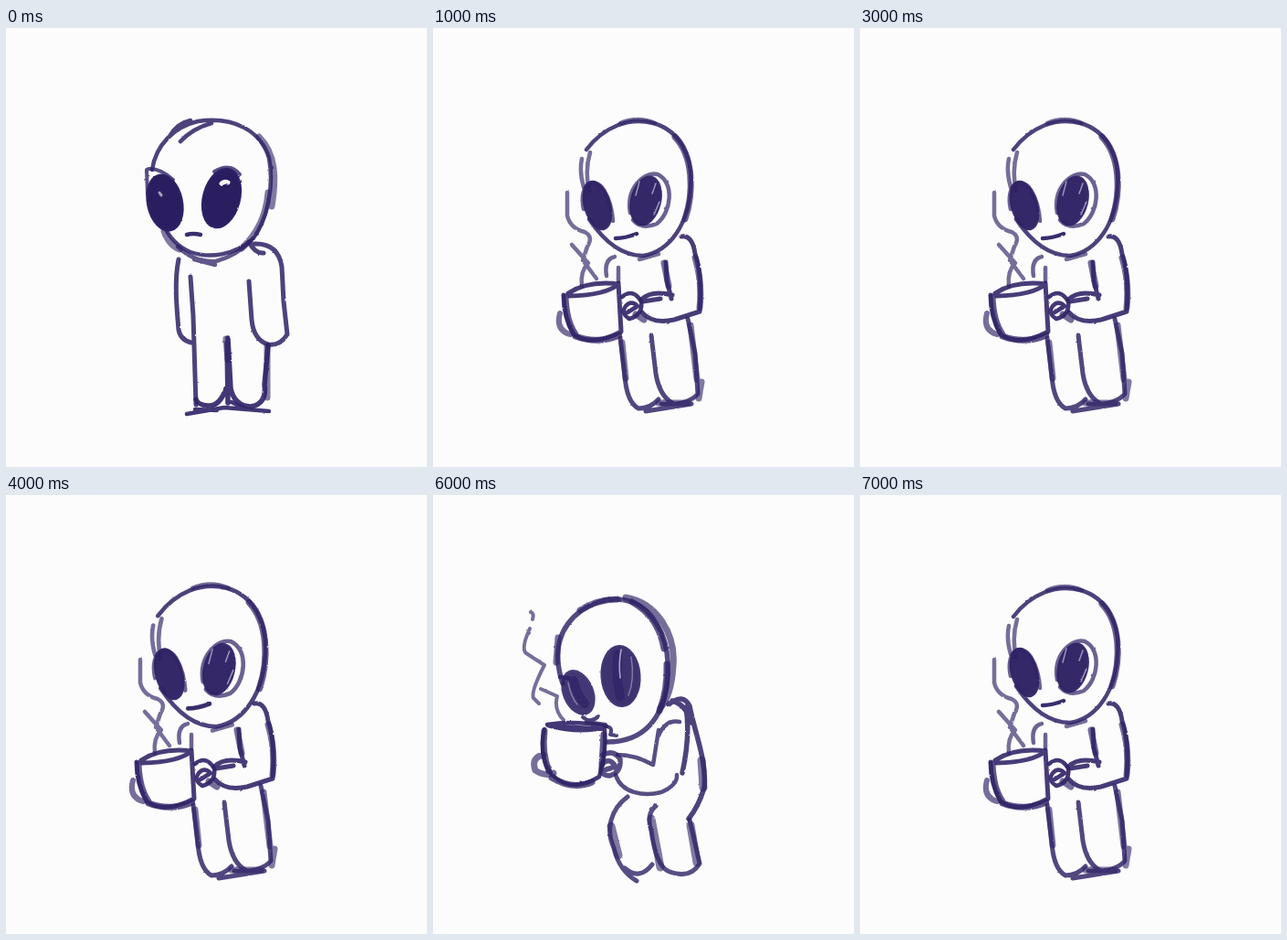
Write an HTML page that moves like this. It is 461x480 px and loops after 8 s.

```html
<!DOCTYPE html>
<html lang="en">
<head>
<meta charset="utf-8">
<title>Alien coffee break</title>
<style>
  html, body { margin: 0; width: 100%; height: 100%; overflow: hidden; background: #fcfcfc; }
  svg { display: block; width: 100%; height: 100%; }
  path { fill: none; stroke: #2f2266; stroke-linecap: round; stroke-linejoin: round; }
  ellipse { fill: #2a1d60; stroke: #2f2266; stroke-width: 2; }
</style>
</head>
<body>
<svg id="stage" viewBox="0 0 461 480">
  <filter id="pencil" filterUnits="userSpaceOnUse" x="0" y="0" width="461" height="480" color-interpolation-filters="sRGB">
    <feTurbulence type="fractalNoise" baseFrequency=".2" numOctaves="2" seed="4"/>
    <feDisplacementMap in="SourceGraphic" scale="1.8" xChannelSelector="R" yChannelSelector="G"/>
    <feGaussianBlur stdDeviation=".55"/>
  </filter>
</svg>
<script>
const stage = document.getElementById('stage');

function add(parent, tag, attributes) {
  const node = document.createElementNS('http://www.w3.org/2000/svg', tag);
  for (const name in attributes) node.setAttribute(name, attributes[name]);
  return parent.appendChild(node);
}
const group = (parent = stage) => add(parent, 'g', parent === stage ? { filter: 'url(#pencil)' } : {});
const ink = (parent, width, opacity, ...lines) =>
  add(parent, 'path', { d: lines.join(''), 'stroke-width': width, opacity });
const eye = (parent, cx, cy, rx, ry, tilt, opacity = 1) =>
  add(parent, 'ellipse', { cx, cy, rx, ry, opacity, transform: `rotate(${tilt} ${cx} ${cy})` });
const glint = (parent, d, width, color = '#fcfcfc') =>
  add(parent, 'path', { d, 'stroke-width': width, style: `stroke:${color}` });

function drawStanding() {
  const g = group();
  ink(g, 4.5, .85,
    'M160 155C164 128 184 108 210 102C250 96 279 113 288 142C294 174 286 210 270 231C250 249 222 252 202 245Q181 236 172 214',
    'M191 124Q204 110 225 104', 'M180 117Q188 104 202 101');
  ink(g, 7, .6, 'M277 119C296 138 296 165 291 195', 'M287 180Q284 217 258 241', 'M173 222Q179 238 190 242');
  ink(g, 4.5, .75, 'M188 239Q207 257 230 255Q253 249 270 231', 'M206 253L229 259');
  eye(g, 174, 191, 19, 31, -12);
  eye(g, 236, 186, 20, 33, 15);
  ink(g, 4, .8, 'M154 155L155 182', 'M156 154Q169 153 183 166', 'M228 157Q245 147 256 160');
  glint(g, 'M236 170Q239 167 243 169', 5);
  glint(g, 'M168 180L170 183', 3, '#a49fc0');
  ink(g, 4.5, .95, 'M198 226Q205 224 213 226');
  ink(g, 5, .85,
    'M189 253C184 277 187 307 189 330Q191 341 203 344',
    'M202 272L205 315L208 412',
    'M272 236Q298 235 302 261L304 299L308 335Q300 348 287 346Q271 341 269 319L266 277',
    'M266 234Q273 247 282 246');
  ink(g, 5.5, .9,
    'M287 347L283 390Q286 411 268 414Q250 413 246 394L243 339',
    'M242 344L243 410', 'M241 394Q234 414 221 413Q210 412 208 406');
  ink(g, 7, .6, 'M286 348L286 404', 'M241 340L243 363');
  ink(g, 4.5, .9, 'M198 422L239 415L288 419', 'M207 417L231 418', 'M247 409L263 417');
  return g;
}

function drawSipping() {
  const g = group();
  ink(g, 5.5, .82,
    'M142 206C130 170 139 143 163 126C187 110 215 110 233 126C255 147 260 177 256 208C251 243 232 270 191 270');
  ink(g, 7, .65, 'M211 112C246 118 266 153 263 187Q261 219 249 233', 'M137 156L135 183', 'M161 126Q180 114 202 114');
  ink(g, 7, .75, 'M218 117Q247 133 253 168', 'M256 185Q257 214 248 236');
  ink(g, 4.5, .8, 'M139 199L148 200');
  eye(g, 159, 216, 16, 25, -23, .88);
  eye(g, 205.5, 198, 21, 33, -4, .9);
  ink(g, 10, .7, 'M154 203Q157 218 166 228', 'M202 174Q200 198 205 220');
  glint(g, 'M206 169Q203 184 205 200', 1.6, '#aaa5c7');
  glint(g, 'M148 205Q151 221 158 229M217 177Q221 202 214 219', 1.5, '#817aa7');
  ink(g, 4, .85, 'M164 243Q173 250 181 242', 'M168 248L189 251', 'M188 253Q198 253 194 262L201 263');
  ink(g, 4.5, .9,
    'M125 251Q155 246 190 253Q163 262 126 252', 'M128 252L187 256',
    'M122 256C117 278 121 300 135 310Q155 325 182 308Q190 284 188 257');
  ink(g, 7, .75, 'M122 258Q119 282 127 302', 'M130 309Q153 323 174 314', 'M187 262L185 294');
  ink(g, 7, .65, 'M121 284Q107 287 112 301Q122 308 132 304');
  ink(g, 5.5, .8, 'M186 284Q198 278 205 289Q206 304 193 307Q181 306 185 294Q193 286 200 297L187 301');
  ink(g, 4.5, .8,
    'M202 284Q221 284 241 295L247 257', 'M247 263Q255 245 270 248',
    'M200 306C206 326 231 330 250 325Q268 317 267 306');
  ink(g, 5.5, .85, 'M258 229Q274 216 281 231C287 261 300 291 297 320Q291 340 280 354',
    'M277 232Q282 262 273 304', 'M262 225Q277 229 283 249');
  ink(g, 5, .8,
    'M213 330C194 344 189 366 198 386Q204 411 223 422', 'M210 408Q226 422 240 404',
    'M244 340Q233 349 239 367Q244 404 257 411Q281 421 292 403L281 355');
  ink(g, 9, .6, 'M282 361L289 402', 'M195 362L203 394', 'M239 354L249 407', 'M294 290L296 320');
  ink(g, 4, .65,
    'M107 128Q111 129 109 136',
    'M106 146Q96 168 102 173L122 186Q107 215 110 222L116 228',
    'M118 212L136 220Q132 235 143 246');
  return g;
}

function drawHolding() {
  const g = group();
  const head = group(g);
  ink(head, 4.5, .85,
    'M168 133C187 108 215 97 241 104C271 112 285 142 282 175C280 212 261 244 230 249C205 249 185 230 171 209');
  ink(head, 4.5, .65, 'M163 143Q160 157 165 174', 'M172 136Q166 156 171 178', 'M205 104Q224 96 243 104', 'M226 253L247 247');
  ink(head, 7, .7, 'M265 119C285 140 286 179 276 209');
  eye(head, 180, 194, 14, 27, -16, .95);
  eye(head, 233, 189, 16, 27, 14, .95);
  ink(head, 4.5, .7, 'M165 198C159 171 176 161 187 177Q196 192 197 211',
    'M216 202C211 176 231 156 246 160C265 169 261 202 245 214Q229 221 219 210');
  glint(head, 'M226 168L222 183M244 170L240 181M248 190L242 204', 1.5, '#9b95bc');
  ink(head, 4.5, .95, 'M200 230Q210 230 223 225');

  ink(g, 4.5, .65,
    'M147 180L147 205Q150 219 166 223Q176 228 169 239L164 254L179 274',
    'M152 237L170 257Q161 266 163 282');
  ink(g, 4.5, .7, 'M190 271Q187 253 199 250', 'M203 262L203 277');
  ink(g, 5, .88,
    'M148 290Q170 276 203 280Q190 292 149 293',
    'M203 279L206 332Q174 349 154 335Q143 316 143 292');
  ink(g, 7, .75, 'M145 294Q146 321 156 335', 'M156 337Q180 346 204 336');
  ink(g, 6, .65, 'M139 312Q134 330 150 335');
  ink(g, 4.5, .9, 'M207 294Q219 284 228 299Q230 314 215 318Q205 312 211 304Q217 297 224 304L213 311');
  ink(g, 5, .88,
    'M228 297Q239 286 262 292', 'M230 299L249 296', 'M255 256L256 276L261 296',
    'M229 311Q240 324 264 319L292 310Q295 270 287 247Q284 226 272 228');
  ink(g, 7, .65, 'M287 251Q295 277 292 306', 'M253 257L258 282', 'M222 313L231 319');
  ink(g, 5, .83,
    'M205 339L210 380Q212 409 225 416Q238 416 247 406',
    'M239 336L244 378Q248 402 262 410',
    'M279 318L287 356L290 400Q279 413 250 411', 'M233 419L283 411');
  ink(g, 7, .6, 'M282 325L289 384', 'M294 387L291 405', 'M207 344L211 383', 'M247 410L279 410');
  return { pose: g, head };
}

const standing = drawStanding();
const sipping = drawSipping();
const { pose: holding, head } = drawHolding();
const poses = [standing, holding, sipping];
const sequence = [standing, holding, sipping, holding, holding, holding, sipping, holding];
const nudgedHead = 'translate(223 176.5) scale(1.03 1.045) translate(-223 -175.5)';

function render() {
  const beat = Math.floor(performance.now() % 8000 / 1000);
  for (const pose of poses) pose.style.display = pose === sequence[beat] ? '' : 'none';
  head.setAttribute('transform', beat === 4 ? nudgedHead : '');
  requestAnimationFrame(render);
}
render();
</script>
</body>
</html>
```
